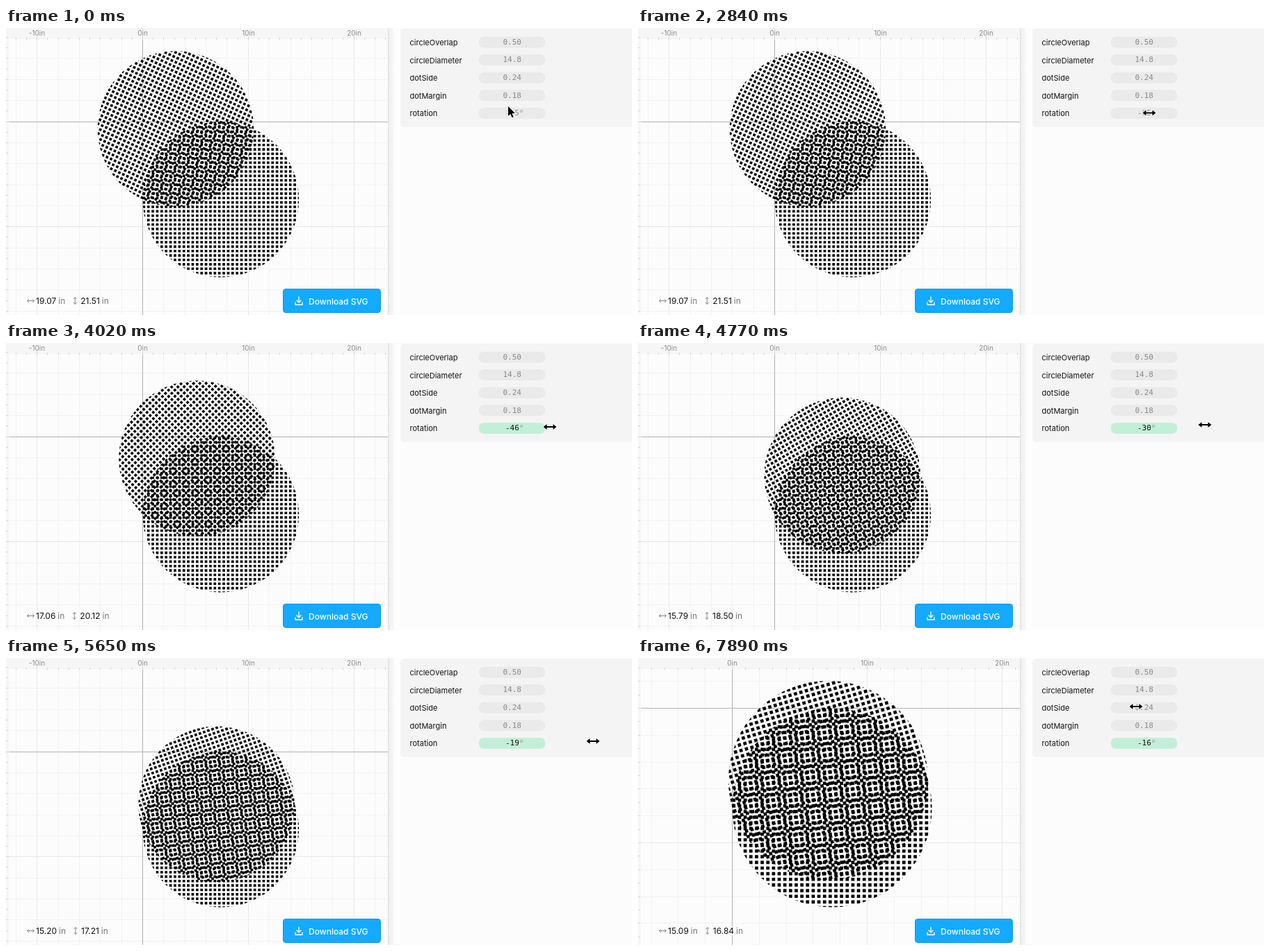
These frames come from a looping animation (900x414 px, 8000 ms). An HTML page with a canvas:

```html
<!DOCTYPE html>
<html lang="en">
<head>
<meta charset="utf-8">
<title>Rotating dot circles</title>
<style>
  html, body { margin: 0; width: 100%; height: 100%; overflow: hidden; background: #fcfcfc; }
  canvas { display: block; width: 900px; height: 414px; }
</style>
</head>
<body>
<canvas id="stage" width="900" height="414"></canvas>
<script>
const ctx = document.getElementById('stage').getContext('2d');
const LOOP = 8000, STEP = 148.8;
const SANS = 'Inter, "Open Sans", sans-serif';
const MONO = '"DejaVu Sans Mono", "Noto Sans Mono", monospace';
const BG = '#fcfcfc';

const DIAMETER = 14.8, RADIUS = DIAMETER / 2, DOT = 0.24, PITCH = 0.42;
const VIEW_WIDTH = 549;
const WIDE = { x: 196.5, y: 135, scale: 15.18 };
const CLOSE = { x: 135.5, y: 72.5, scale: 19.4 };
const ZOOM_STEP = 42, DRAG_STEP = 20;

// [step, x, y] of the pointer and [step, degrees] of the rotation
const POINTER = [
  [0, 722, 113], [1, 724, 120], [4, 731, 123], [18, 731, 123], [19, 735, 122.5],
  [24, 758, 122.5], [27, 782, 121], [32, 815, 118], [34, 822, 118], [38, 844, 120],
  [40, 850, 120], [41, 850, 120], [42, 838, 117], [45, 729, 95], [47, 729, 95],
  [48, 724, 92], [51, 692, 75], [53, 716, 70]
];
const ANGLE = [[0, -65], [19, -65], [24, -56], [27, -46], [32, -30], [34, -26], [38, -19], [40, -16]];
const ROWS = [['circleOverlap', '0.50'], ['circleDiameter', '14.8'], ['dotSide', '0.24'], ['dotMargin', '0.18'], ['rotation']];

function sample(keys, step, field = 1) {
  const i = keys.findIndex(k => k[0] > step);
  if (i < 0) return keys[keys.length - 1][field];
  const a = keys[i - 1], b = keys[i];
  return a[field] + (b[field] - a[field]) * (step - a[0]) / (b[0] - a[0]);
}

function text(str, x, y, font, color, align = 'left') {
  ctx.font = font;
  ctx.fillStyle = color;
  ctx.textAlign = align;
  ctx.textBaseline = 'alphabetic';
  ctx.fillText(str, x, y);
}

function box(x, y, w, h, r, fill) {
  ctx.beginPath();
  ctx.roundRect(x, y, w, h, r);
  ctx.fillStyle = fill;
  ctx.fill();
}

function line(x1, y1, x2, y2, color, width = 1) {
  ctx.beginPath();
  ctx.moveTo(x1, y1);
  ctx.lineTo(x2, y2);
  ctx.strokeStyle = color;
  ctx.lineWidth = width;
  ctx.stroke();
}

function polygon(points) {
  ctx.beginPath();
  points.forEach(([x, y]) => ctx.lineTo(x, y));
  ctx.closePath();
}

const crisp = v => Math.floor(v) + 0.5;

function eachInch(origin, scale, limit, draw) {
  const last = Math.floor((limit - origin) / scale);
  for (let i = Math.ceil(-origin / scale); i <= last; i++) draw(i, crisp(origin + i * scale));
}

function drawGrid(view) {
  const color = i => i % 10 ? '#f2f2f2' : '#e8e8e8';
  const even = draw => (i, p) => { if (i % 2 === 0) draw(i, p); };
  eachInch(view.x, view.scale, VIEW_WIDTH, even((i, x) => line(x, 16, x, 414, color(i))));
  eachInch(view.y, view.scale, 414, even((i, y) => line(0, y, VIEW_WIDTH, y, color(i))));
  line(crisp(view.x), 16, crisp(view.x), 414, '#b2b2b2');
  line(0, crisp(view.y), VIEW_WIDTH, crisp(view.y), '#b2b2b2');
}

function drawRulers(view) {
  ctx.fillStyle = '#f6f6f6';
  ctx.fillRect(0, 0, VIEW_WIDTH, 16);
  ctx.fillRect(0, 16, 4, 398);
  eachInch(view.y, view.scale, 414, (i, y) => line(0, y, i % 10 ? 3 : 5, y, '#d4d4d4'));
  eachInch(view.x, view.scale, VIEW_WIDTH, (i, x) => {
    line(x, i % 10 ? 14 : 12, x, 17, '#d4d4d4');
    if (i % 10 === 0) text(i + 'in', x, 11, '10px ' + SANS, '#8c8c8c', 'center');
  });
}

function drawDots(view, degrees) {
  ctx.save();
  ctx.translate(view.x, view.y);
  ctx.scale(view.scale, view.scale);
  ctx.translate(0, RADIUS);
  ctx.rotate(degrees * Math.PI / 180);
  ctx.translate(0, -RADIUS);
  ctx.beginPath();
  ctx.arc(RADIUS, RADIUS, RADIUS, 0, Math.PI * 2);
  ctx.clip();
  ctx.beginPath();
  for (let x = 0; x < DIAMETER; x += PITCH)
    for (let y = 0; y < DIAMETER; y += PITCH) ctx.rect(x, y, DOT, DOT);
  ctx.fillStyle = '#000';
  ctx.fill();
  ctx.restore();
}

function doubleArrow(x, y, angle, half) {
  ctx.save();
  ctx.translate(x, y);
  ctx.rotate(angle);
  line(-half, 0, half, 0, '#888');
  for (const s of [-1, 1]) {
    line(s * half, 0, s * (half - 2.5), -2.5, '#888');
    line(s * half, 0, s * (half - 2.5), 2.5, '#888');
  }
  ctx.restore();
}

function measurement(value, x) {
  const font = '12px ' + SANS, number = value.toFixed(2);
  ctx.font = font;
  const unitX = x + ctx.measureText(number).width + 3;
  ctx.textAlign = 'left';
  ctx.strokeStyle = BG;
  ctx.lineWidth = 4;
  ctx.lineJoin = 'round';
  ctx.strokeText(number, x, 398);
  ctx.strokeText('in', unitX, 398);
  text(number, x, 398, font, '#111');
  text('in', unitX, 398, font, '#777');
  return unitX + ctx.measureText('in').width;
}

function drawSize(degrees) {
  const a = degrees * Math.PI / 180;
  doubleArrow(35.5, 393.5, 0, 5);
  const end = measurement(DIAMETER + RADIUS * (1 - Math.cos(a)), 43);
  doubleArrow(end + 14, 393.5, Math.PI / 2, 5);
  measurement(DIAMETER - RADIUS * Math.sin(a), end + 22);
}

function drawButton() {
  box(398, 376, 141, 35, 4.5, '#0d98e6');
  box(399, 377, 139, 33, 3.5, '#13aaff');
  ctx.lineCap = 'round';
  ctx.lineJoin = 'round';
  ctx.strokeStyle = '#fff';
  ctx.lineWidth = 1.4;
  ctx.beginPath();
  ctx.moveTo(421, 388);
  ctx.lineTo(421, 396);
  ctx.moveTo(418, 393);
  ctx.lineTo(421, 396);
  ctx.lineTo(424, 393);
  ctx.moveTo(416, 396);
  ctx.lineTo(416, 399.3);
  ctx.lineTo(426, 399.3);
  ctx.lineTo(426, 396);
  ctx.stroke();
  ctx.lineCap = 'butt';
  text('Download SVG', 435, 398.5, '500 12px ' + SANS, '#fff');
}

function drawPanel(degrees, active) {
  ctx.fillStyle = BG;
  ctx.fillRect(VIEW_WIDTH, 0, 351, 414);
  const shade = ctx.createLinearGradient(VIEW_WIDTH, 0, 557, 0);
  shade.addColorStop(0, '#dedede');
  shade.addColorStop(0.3, '#f1f1f1');
  shade.addColorStop(1, '#f6f6f6');
  ctx.fillStyle = shade;
  ctx.fillRect(VIEW_WIDTH, 0, 8, 414);
  box(567, 1, 345, 142, 6, '#f4f4f4');

  const font = '11px ' + MONO;
  ROWS.forEach(([label, value], i) => {
    const y = 20.5 + i * 25.6;
    text(label, 580.5, y + 4.5, '11px ' + SANS, '#111');
    box(679.5, y - 8, 96, 16, 8, !value && active ? '#c3efd8' : '#eaeaea');
    if (value) {
      text(value, 714.5, y + 3.2, font, '#888');
    } else {
      const digits = String(Math.round(degrees));
      text(digits, 718, y + 3.2, font, active ? '#111' : '#888');
      text('°', 718 + ctx.measureText(digits).width, y + 3.2, font, '#888');
    }
  });
}

function drawPointer(x, y, resize) {
  ctx.save();
  ctx.translate(x, y);
  if (resize) {
    const right = [[4.5, -1], [4.5, -4], [9.5, 0], [4.5, 4], [4.5, 1]];
    polygon([...right, ...right.map(([px, py]) => [-px, -py])]);
  } else {
    polygon([[0, 0], [0, 14], [3.2, 11], [5.5, 16.2], [7.7, 15.3], [5.4, 10.2], [9.8, 10]]);
  }
  ctx.strokeStyle = '#fff';
  ctx.lineWidth = 2.2;
  ctx.lineJoin = 'round';
  ctx.stroke();
  ctx.fillStyle = '#000';
  ctx.fill();
  ctx.restore();
}

function render(ms) {
  const step = Math.floor((ms % LOOP) / STEP + 0.1);
  const view = step < ZOOM_STEP ? WIDE : CLOSE;
  const degrees = Math.round(sample(ANGLE, step));

  ctx.fillStyle = BG;
  ctx.fillRect(0, 0, 900, 414);
  drawGrid(view);
  drawDots(view, 0);
  drawDots(view, degrees);
  drawRulers(view);
  drawSize(degrees);
  drawButton();
  drawPanel(degrees, step >= DRAG_STEP);
  const resize = step > 0 && (step < ZOOM_STEP || step > 44);
  drawPointer(sample(POINTER, step), sample(POINTER, step, 2), resize);
}

const start = performance.now();
function tick() {
  render(performance.now() - start);
  requestAnimationFrame(tick);
}
tick();
</script>
</body>
</html>
```
